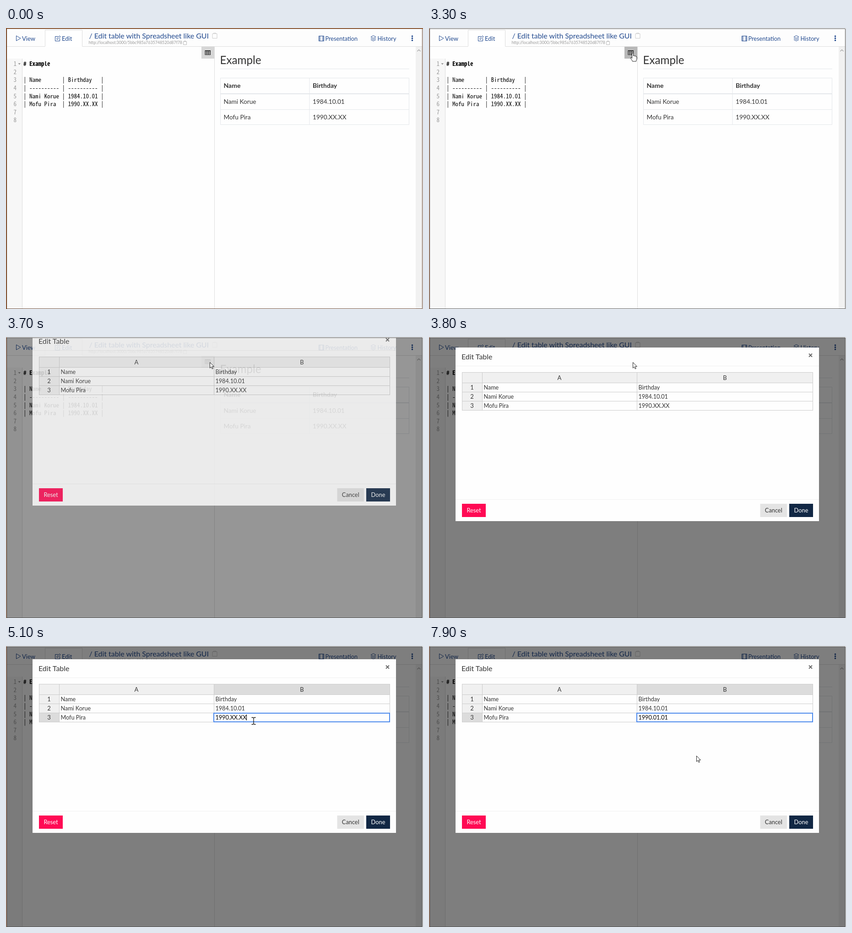
An HTML page for the animation above (8000 ms loop, 911 by 615 pixels).

```html
<!DOCTYPE html>
<html lang="en">
<head>
<meta charset="utf-8">
<title>Edit table</title>
<style>
  html, body { margin: 0; width: 100%; height: 100%; overflow: hidden; background: #fff; }
  svg { display: block; width: 911px; height: 615px; }
  text { font-family: Lato, sans-serif; font-size: 13px; white-space: pre; }
  .mono { font-family: "Noto Sans Mono CJK JP", "Liberation Mono", monospace; font-size-adjust: ch-width 0.5; }
  .bold { font-weight: 700; }
</style>
</head>
<body>
<svg id="stage" viewBox="0 0 911 615" xmlns="http://www.w3.org/2000/svg"></svg>
<script>
const LOOP = 8000;
const LINK = '#224a8f', INK = '#333', RULE = '#ddd', TABLE = '#e4e7ea', TOOL = '#d6d6d6';
const CELL = 12.6;
const people = ['Nami Korue', 'Mofu Pira'];
const rows = [['Name', 'Birthday'], [people[0], '1984.10.01'], [people[1], '1990.XX.XX']];
const stage = document.getElementById('stage');

function el(parent, tag, attrs, content) {
  const node = document.createElementNS('http://www.w3.org/2000/svg', tag);
  for (const k in attrs) node.setAttribute(k, attrs[k]);
  if (content !== undefined) node.textContent = content;
  return parent.appendChild(node);
}
const group = (parent, attrs = {}) => el(parent, 'g', attrs);
const rect = (g, x, y, width, height, fill, more) => el(g, 'rect', { x, y, width, height, fill, ...more });
const label = (g, x, y, str, size = 13, fill = INK, more) =>
  el(g, 'text', { x, y, fill, style: `font-size:${size}px`, ...more }, str);
const stroke = (g, d, color, width = 1, more) =>
  el(g, 'path', { d, fill: 'none', stroke: color, 'stroke-width': width, ...more });

function drawNav(g) {
  rect(g, 2, 2, 907, 38, '#fdfdfd');
  rect(g, 2, 40, 907, 1, RULE);
  rect(g, 85, 4, 82, 37, '#fff');
  stroke(g, 'M85.5 40.5V4.5H166.5V40.5', RULE);

  stroke(g, 'M22.5 17L32 22.5L22.5 28Z', LINK);
  label(g, 35, 28, 'View', 13, LINK);
  stroke(g, 'M114 18.5H107.5V28.5H117.5V23', LINK);
  stroke(g, 'M111 25L111.5 22.5L117 17L119 19L113.5 24.5Z', LINK);
  label(g, 122, 28, 'Edit', 13, LINK);

  label(g, 181.5, 23, '/ Edit table with Spreadsheet like GUI', 15.9, LINK);
  label(g, 180.5, 35, 'http://localhost:3000/5bbc985a7635748520d87f78', 8.85, '#999');
  stroke(g, 'M451 12.5H461V22.5H451ZM453.5 12.5V11H458.5V12.5', '#ccc');
  stroke(g, 'M387.5 29.5H394.5V36.5H387.5ZM389.5 29V28.5H392.5V29', '#bbb');

  stroke(g, 'M683.5 17.5H694.5V28.5H683.5ZM686 17.5V28.5M692 17.5V28.5', LINK);
  stroke(g, 'M684.8 19V28M693.3 19V28', LINK, 1, { 'stroke-dasharray': '1 1.5' });
  label(g, 697.5, 28, 'Presentation', 12.7, LINK);
  stroke(g, 'M802.5 16.5L808 19.5L802.5 22.5L797 19.5ZM797 22.5L802.5 25.5L808 22.5M797 25.5L802.5 28.5L808 25.5', LINK);
  label(g, 811.5, 28, 'History', 12.7, LINK);
  for (const cy of [18, 22.5, 27]) el(g, 'circle', { cx: 887.5, cy, r: 1.8, fill: LINK });
}

function drawEditor(g) {
  rect(g, 2, 67, 33, 548, '#f7f7f7');
  rect(g, 35, 67, 1, 548, RULE);
  const pad = r => `| ${r[0].padEnd(10)} | ${r[1].padEnd(10)} |`;
  const dash = '-'.repeat(10);
  const lines = ['# Example', '', pad(rows[0]), pad([dash, dash]), pad(rows[1]), pad(rows[2]), '', ''];
  lines.forEach((line, i) => {
    const y = Math.round(83 + 17.64 * i);
    label(g, 16.5, y, i + 1, 13, '#999', { class: 'mono' });
    label(g, 38, y, line, 13, '#000', { class: i ? 'mono' : 'mono bold' });
  });
  el(g, 'path', { d: 'M26.5 77H32L29.2 80.5Z', fill: '#999' });

  const button = rect(g, 427, 41, 28, 26, TOOL);
  rect(g, 434.5, 49, 12.5, 10, '#222');
  for (let i = 0; i < 9; i++)
    rect(g, 435.5 + 3.8 * (i % 3), 51 + 2.6 * Math.floor(i / 3), 2.9, 1.7, TOOL);
  rect(g, 455, 41, 1, 574, RULE);
  return button;
}

function drawPreview(g) {
  label(g, 467.5, 78.5, 'Example', 24.2);
  rect(g, 468, 89, 413, 1, TABLE);
  stroke(g, 'M468.5 109.5H880.5V211.5H468.5ZM663 109.5V211.5M468.5 178.5H880.5', TABLE);
  rect(g, 468, 143, 413, 2, TABLE);
  rows.forEach((row, i) => row.forEach((cell, j) =>
    label(g, j ? 670 : 475.5, [131, 166, 200][i], cell, i ? 13.65 : 14, INK, i ? {} : { class: 'bold' })));

  rect(g, 895, 41, 14, 574, '#f1f1f1');
  stroke(g, 'M898.5 51L902 47.5L905.5 51', '#a0a0a0', 1.2);
}

function drawModal(g) {
  rect(g, 58, 29, 794, 380, '#fefefe');
  label(g, 71, 55, 'Edit Table', 15.9);
  stroke(g, 'M830 42.5L837 49.5M837 42.5L830 49.5', '#666', 1.9);
  rect(g, 58, 69, 794, 1, '#f0f0f0');
  rect(g, 58, 361, 794, 1, '#f0f0f0');

  rect(g, 72, 83, 767, 23, '#f0f0f0');
  rect(g, 72, 106, 44, 60, '#f0f0f0');
  const marks = [rect(g, 454, 83, 385, 23, '#dcdcdc'), rect(g, 72, 146, 44, 20, '#dcdcdc')];
  stroke(g, 'M72 83.5H839M72 106.5H839M72 126.5H839M72 146.5H839M72 166.5H839M72.5 83V167M116.5 83V167M454.5 83V167M838.5 83V167', '#ccc');
  const mid = { 'text-anchor': 'middle' };
  label(g, 285, 100, 'A', 13, INK, mid);
  label(g, 646.5, 100, 'B', 13, INK, mid);
  let value;
  rows.forEach((row, i) => {
    const y = 121 + 20 * i;
    label(g, 94, y, i + 1, 13, INK, mid);
    label(g, 119.5, y, row[0], CELL);
    value = label(g, 457.5, y, row[1], CELL);
  });
  marks.push(rect(g, 454, 147, 384, 19, 'none', { stroke: '#4b89ec', 'stroke-width': 2 }));
  const caret = rect(g, 0, 150, 1, 13, '#000');

  const button = (x, w, fill, str, ink) => {
    rect(g, x, 371, w, 29, fill);
    label(g, x + w / 2, 390, str, 12.8, ink, mid);
  };
  button(72, 52, '#ff0a54', 'Reset', '#fff');
  button(723.5, 58.5, '#e4e4e4', 'Cancel', INK);
  button(787, 52, '#112744', 'Done', '#fff');
  return { marks, value, caret };
}

// Pointer shapes, hot spot at 0,0
function drawPointers() {
  const make = (d, fill, color, width) =>
    el(stage, 'path', { d, fill, stroke: color, 'stroke-width': width, 'stroke-linejoin': 'round' });
  return {
    arrow: make('M.5 .5V13L3.4 10.3L5.3 14.8L7.3 14L5.4 9.6H9.4Z', '#fff', '#222', 1),
    beam: make('M-4.5 -7.5H-1.5L0 -6.5L1.5 -7.5H4.5M0 -6.5V6.5M-4.5 7.5H-1.5L0 6.5L1.5 7.5H4.5', 'none', '#111', 1.3),
    hand: make('M-1.5 1Q0 -1.5 1.5 1V6L3 5.5L4.5 6.5L6 6L7 7.2Q9 7 9 9V13Q8 15 7.5 18H-.5Q-1 15.5 -4.5 11.5Q-5 9 -3 9.8L-1.5 11.2Z', '#fff', '#222', 1)
  };
}

const app = group(stage);
rect(app, 0, 0, 911, 615, '#fefefe');
drawNav(app);
const toolButton = drawEditor(app);
drawPreview(app);
const backdrop = rect(stage, 2, 2, 907, 612, '#000');
const modal = group(stage);
const sheet = drawModal(modal);
const frame = group(stage);
const topEdge = rect(frame, 0, 0, 911, 2, '#fff');
const leftEdge = rect(frame, 0, 0, 1, 615, '#fff');
rect(frame, 910, 2, 1, 613, '#eee');
const edge = stroke(frame, 'M1.5 1.5H909.5V614.5H1.5Z', '#555');
const leftLine = rect(frame, 1, 1, 1, 614, '#4a352b');
const pointers = drawPointers();

// [time, x, y, shape]
const pointerSteps = [
  [0, 0, 0, ''],
  [900, 800, 330, 'arrow'], [1000, 690, 290, 'arrow'], [1100, 560, 250, 'arrow'],
  [1200, 420, 215, 'beam'], [1300, 300, 180, 'beam'], [1400, 227, 160, 'beam'],
  [1800, 223, 164, 'beam'], [1900, 218, 168, 'beam'], [2200, 241, 158, 'beam'],
  [2400, 262, 157, 'beam'], [2500, 285, 156, 'beam'], [2600, 302, 156, 'beam'],
  [2800, 325, 145, 'beam'], [2900, 365, 115, 'beam'], [3000, 400, 88, 'beam'],
  [3100, 432, 64, 'hand'], [3200, 440, 58, 'hand'], [3300, 445, 55, 'hand'],
  [3500, 445, 55, 'arrow'], [4200, 455, 64, 'arrow'], [4300, 470, 86, 'arrow'],
  [4400, 490, 115, 'arrow'], [4500, 510, 138, 'arrow'], [4600, 525, 151, 'arrow'],
  [4700, 532, 158, 'arrow'], [4900, 532, 158, 'beam'], [5100, 541, 164, 'beam'],
  [5300, 554, 178, 'arrow'], [5400, 566, 196, 'arrow'], [5500, 577, 217, 'arrow'],
  [5600, 584, 240, 'arrow']
];
// [time, backdrop opacity, modal opacity, modal offset]
const fadeSteps = [
  [0, 0, 0, -95], [3500, .15, 0, -95], [3700, .41, .82, -40], [3800, .5, 1, -6], [3900, .5, 1, 0]
];
// [time, cell text]
const typeSteps = [
  [0, '1990.XX.XX'], [5600, '1990.XX.X'], [6100, '1990.XX.'], [6300, '1990.XX'],
  [6500, '1990.X'], [6700, '1990.'], [7100, '1990.0'], [7300, '1990.01'],
  [7400, '1990.01.'], [7500, '1990.01.0'], [7700, '1990.01.01']
];
const at = (steps, t) => steps.findLast(s => s[0] <= t);
const show = (node, on) => node.setAttribute('visibility', on ? 'visible' : 'hidden');

function render(t) {
  const early = t < 900;
  topEdge.setAttribute('fill', early ? '#a8632f' : '#fff');
  edge.setAttribute('stroke', early ? '#6b4a38' : '#555');
  leftEdge.setAttribute('fill', early ? '#a8632f' : '#c9a58e');
  leftLine.setAttribute('fill', early ? '#4f2d1b' : '#4a352b');

  toolButton.setAttribute('fill', t >= 3100 && t < 3500 ? '#b8b8b8' : TOOL);

  const [, dim, alpha, dy] = at(fadeSteps, t);
  backdrop.setAttribute('opacity', dim);
  modal.setAttribute('opacity', alpha);
  modal.setAttribute('transform', `translate(0 ${dy})`);

  sheet.marks.forEach(m => show(m, t >= 4700));
  const editing = t >= 4900;
  sheet.value.textContent = at(typeSteps, t)[1];
  sheet.value.setAttribute('fill', editing ? '#000' : INK);
  sheet.caret.setAttribute('x', Math.round(457 + sheet.value.getComputedTextLength()));
  show(sheet.caret, editing && t < 7900);

  const [, x, y, shape] = at(pointerSteps, t);
  for (const name in pointers) show(pointers[name], name === shape);
  if (shape) pointers[shape].setAttribute('transform', `translate(${x} ${y})`);
}

function tick() {
  render(performance.now() % LOOP);
  requestAnimationFrame(tick);
}
tick();
</script>
</body>
</html>
```
